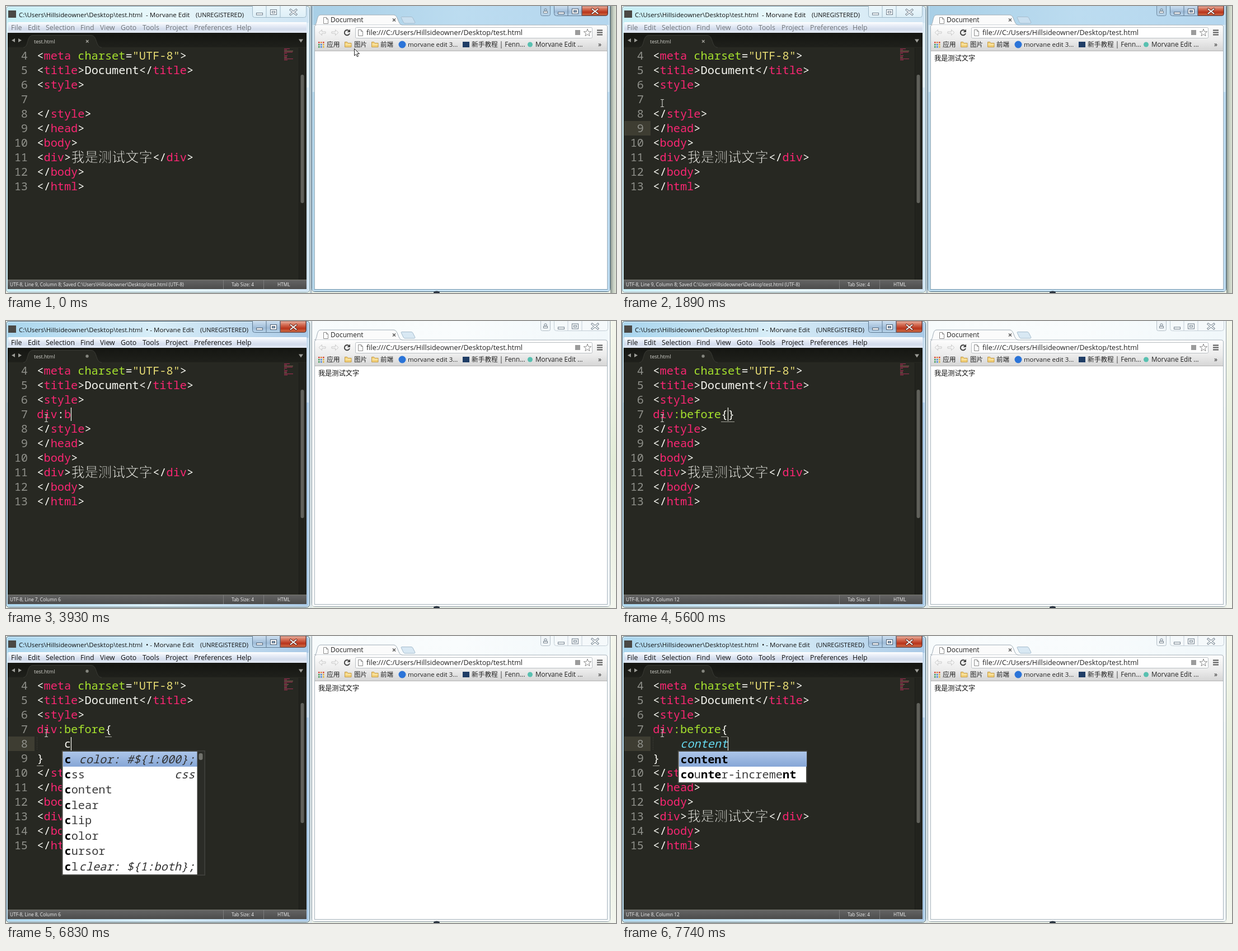
These frames come from a looping animation (1090 px wide and 514 px high, 8000 ms). An HTML page:

```html
<!DOCTYPE html>
<html lang="en">
<head>
<meta charset="utf-8">
<title>Editor and browser</title>
<style>
html, body { margin: 0; width: 100%; height: 100%; overflow: hidden; background: #eaf0e6; }
svg { display: block; width: 1090px; height: 514px; }
text { white-space: pre; font-family: "Open Sans", "Noto Sans CJK SC", "Noto Sans CJK", sans-serif; }
.code { font-family: "Noto Sans Mono", "Noto Sans CJK SC", "Noto Sans CJK", monospace; font-size: 20.28px; }
.cjk { font-family: "Noto Sans CJK SC", "Noto Sans CJK", sans-serif; font-weight: 300; }
.thin { stroke: #272822; stroke-width: .8px; }
</style>
</head>
<body>
<svg id="stage" viewBox="0 0 1090 514" xmlns="http://www.w3.org/2000/svg">
  <defs id="defs"></defs>
  <g id="windows"></g>
  <g id="editor"></g>
  <g id="page"></g>
  <g id="popup"></g>
  <g id="pointer"></g>
</svg>
<script>
const LOOP = 8000, CELL = 12.17, CODE_X = 55.3;
const USER = 'Hillsideowner', APP = 'Morvane Edit';
const HUE = { w: '#f8f8f2', p: '#f92672', g: '#a6e22e', y: '#e6db74', c: '#66d9ef' };

const $ = id => document.getElementById(id);
const esc = s => s.replace(/&/g, '&amp;').replace(/</g, '&lt;').replace(/>/g, '&gt;');
const rect = (x, y, w, h, fill, more = '') =>
  `<rect x="${x}" y="${y}" width="${w}" height="${h}" fill="${fill}" ${more}/>`;
const path = (d, fill, more = '') => `<path d="${d}" fill="${fill}" ${more}/>`;
const line = (d, color, width = 1, more = '') =>
  path(d, 'none', `stroke="${color}" stroke-width="${width}" ${more}`);
const text = (x, y, s, size, fill, more = '') =>
  `<text x="${x}" y="${y}" font-size="${size}" fill="${fill}" ${more}>${esc(s)}</text>`;
const code = (x, y, s, fill, more = '') =>
  `<text class="code" x="${x.toFixed(2)}" y="${y}" fill="${fill}" ${more}>${esc(s)}</text>`;

// Latest row of a [time, value] table
function at(table, t) {
  let value = table[0][1];
  for (const [time, v] of table) if (t >= time) value = v;
  return value;
}

const shades = {
  glassOn: ['#a9d5ed', '#d9eef8', '#a9c9e6'],
  glassOff: ['#c6eef5', '#e9f8fb', '#cfe4f3'],
  sky: ['#a8cfe6', '#bcdcf0', '#b4d6ee'],
  pale: ['#f7fbfc', '#f9fcfd', '#f0f7fa'],
  shadow: ['#87928c', '#c3ccc0', '#dde3d6']
};
const falls = {
  menu: ['#ffffff', '#e6ecf6', '#d3dcec', '#e6ecf6'],
  tabs: ['#151612', '#1f201b'],
  red: ['#e9b5a5', '#d46d54', '#b8341b', '#d4744c'],
  blue: ['#d9e9f6', '#bdd3e8', '#9fbcd8', '#bcd8ee'],
  clear: ['#eef8fc', '#deeff7'],
  status: ['#656565', '#4c4c4c'],
  tool: ['#fdfdfd', '#ececec'],
  marks: ['#eeeeee', '#d6d6d6'],
  pick: ['#adc6e9', '#86a6d6'],
  side: ['#f4f6ec', '#e3ecd8', '#f3f6ee']
};
const gradient = (id, list, dir) => `<linearGradient id="${id}" x2="${dir === 'x' ? 1 : 0}" y2="${dir === 'y' ? 1 : 0}">` +
  list.map((c, i) => `<stop offset="${i / (list.length - 1)}" stop-color="${c}"/>`).join('') + '</linearGradient>';
$('defs').innerHTML =
  Object.entries(shades).map(([id, l]) => gradient(id, l, 'x')).join('') +
  Object.entries(falls).map(([id, l]) => gradient(id, l, 'y')).join('');

// Minimise, maximise and close buttons
function buttons(x, y, h, active, faded) {
  const edge = active ? '#5d7890' : faded ? '#c3ced6' : '#9fb9c8';
  const ink = active ? '#ffffff' : faded ? '#f8fbfc' : '#f4f8fa';
  const base = active ? 'url(#blue)' : faded ? '#f5f9fb' : 'url(#clear)';
  const outline = `stroke="${active ? '#4e5e70' : '#6f7d8a'}"`;
  const cx = x + 73.5, cy = y + h / 2 + .5;
  const cross = `M${cx - 5} ${cy - 4}L${cx + 5} ${cy + 4}M${cx + 5} ${cy - 4}L${cx - 5} ${cy + 4}`;
  return rect(x + .5, y - 3.5, 96, h + 3, base, `rx="4" stroke="${edge}"`) +
    (active ? path(`M${x + 50} ${y}H${x + 96}V${y + h - 4}q0 3-3 3H${x + 50}Z`, 'url(#red)', 'stroke="#6d2a22"') : '') +
    line(`M${x + 25} ${y}v${h - 1}M${x + 50} ${y}v${h - 1}`, edge) +
    rect(x + 7.5, cy + 1.5, 11, 3.5, ink, outline) +
    rect(x + 32.5, cy - 4.5, 11, 9, ink, outline) + rect(x + 35.5, cy - 1.5, 5, 3, active ? '#8aa6c2' : '#f4f8fa', outline) +
    line(cross, active ? '#5e2a22' : '#6f7d8a', 3.6, 'stroke-linecap="square"') +
    line(cross, ink, 1.8, 'stroke-linecap="square"');
}

function docIcon(x, y) {
  return path(`M${x + .5} ${y + .5}h5l3 3v8h-8z`, '#fff', 'stroke="#8b8b8b"') +
    line(`M${x + 5.5} ${y + .5}v3h3`, '#8b8b8b');
}

function folder(x) {
  return path(`M${x + .5} 73.5v-9h4l1.5 2h6v7z`, '#f3d27c', 'stroke="#c39a45"') +
    line(`M${x + 1} 68.5h10.5`, '#fff1c0');
}

function editorFrame(active) {
  const menu = [['File', 9], ['Edit', 39], ['Selection', 71], ['Find', 133], ['View', 168], ['Goto', 205],
    ['Tools', 244], ['Project', 285], ['Preferences', 336], ['Help', 412]];
  return rect(0.5, 0.5, 542, 512, `url(#${active ? 'glassOn' : 'glassOff'})`, `stroke="${active ? '#35566e' : '#7899aa'}" rx="5"`) +
    rect(1, 30, 541, 116, '#fff', 'opacity=".35"') +
    rect(1.5, 1.5, 540, 510, 'none', 'stroke="#effafd" rx="4"') +
    rect(4, 8, 14, 13, '#4a4845') +
    buttons(440, 0, 21, active) +
    rect(4, 29, 533, 19, 'url(#menu)') +
    menu.map(([s, x]) => text(x, 43, s, 12.3, active ? '#111' : '#70757a')).join('') +
    rect(3, 48, 534, 459, '#272822') + rect(3, 48, 534, 26, 'url(#tabs)') +
    path('M30 75C41 75 36 52 48 52H152C164 52 159 75 172 75Z', '#272822') +
    line('M31 74.5C41 74 36 52.5 48 52.5H152C164 52.5 159 74 171 74.5', '#3a3b35') +
    path('M16 58v7l-6-3.5zM22 58v7l6-3.5zM523 59.5h8l-4 6z', '#9b9b96') +
    text(50, 67, 'test.html', 9, '#d5d5cf') +
    rect(524, 75, 13, 415, '#22231e') + line('M523.5 75V490', '#1c1d19') +
    rect(3, 490, 534, 17, 'url(#status)') + line('M3 490.5H537', '#77776f') +
    line('M388.5 491V507M460.5 491V507', '#7c7c7c') +
    text(403, 502, 'Tab Size: 4', 8.3, '#f0f0f0') + text(485, 502, 'HTML', 8.3, '#f0f0f0');
}

function browserFrame(active) {
  const star = Array.from({ length: 10 }, (_, i) => {
    const r = i % 2 ? 2.8 : 7, a = (i / 5 - .5) * Math.PI;
    return (1039 + r * Math.cos(a)).toFixed(1) + ' ' + (48 + r * Math.sin(a)).toFixed(1);
  }).join('L');
  const dots = ['#d9483b', '#e2843a', '#d9483b', '#3e9a5b', '#4a84d8', '#e0b33c', '#3e9a5b', '#4a84d8', '#e0b33c'];
  const ink = '#222';
  return rect(1080, 0, 10, 514, `url(#${active ? 'shadow' : 'side'})`) + rect(543, 0, 4, 514, active ? '#b9c8cf' : '#dfe8ea') +
    rect(546.5, -4.5, 533, 516, `url(#${active ? 'sky' : 'pale'})`, `stroke="${active ? '#3f6078' : '#8d9ba4'}" rx="5"`) +
    rect(547, 34, 532, 120, '#fff', 'opacity=".4"') +
    line('M548 0V510H1078V0', active ? '#e2f1fa' : '#ffffff') +
    rect(955.5, -3.5, 17, 21, active ? '#b4d0e6' : '#f0f5f8', `rx="3" stroke="${active ? '#6f8ca4' : '#b5c0c8'}"`) +
    `<circle cx="964" cy="7" r="2.2" fill="none" stroke="#74818c"/>` + rect(960.5, 9.5, 7, 3, '#fff', 'stroke="#74818c"') +
    buttons(979, 0, 18, active, !active) +
    path('M551 34C557 34 554 16 562 16H693C701 16 700 34 708 34Z', '#fbfbfb', 'stroke="#a0adb7"') +
    path('M706 20.5q0-1 2-1h16q2 0 3 2l4 8q0 1.5-2 1.5h-16q-2 0-3-2z', active ? '#c9dfef' : '#d8e8f3', 'stroke="#a6bccd"') +
    docIcon(567, 20) + text(580, 29, 'Document', 12, ink) +
    line('M691 22.5l5 5m0-5l-5 5', '#5a5a5a', 1.5) +
    rect(551, 34, 524, 26, 'url(#tool)') + line('M551.5 507V37q0-3 3-3M707 34H1071q3.5 0 3.5 3V507', '#a9b4bc') +
    path('M559 47.5l5.5-5v3.5h6.5v3h-6.5v3.5z', '#f5f5f5', 'stroke="#c9c9c9"') +
    path('M594 47.5l-5.5-5v3.5h-6.5v3h6.5v3.5z', '#f5f5f5', 'stroke="#c9c9c9"') +
    line('M613 44.5a4.7 4.7 0 1 0 1 4.5', '#454545', 2) + path('M615 41.5v5.5h-5.5z', '#454545') +
    rect(624.5, 38.5, 423, 19, '#fff', 'rx="2" stroke="#b9bec2"') + docIcon(629, 42) +
    text(644, 52, `file:///C:/Users/${USER}/Desktop/test.html`, 12.6, ink) +
    rect(1017, 43, 9, 9, '#9b9b9b') +
    path('M' + star + 'Z', '#fff', 'stroke="#8c8c8c"') +
    line('M1056 43.5h10M1056 47.5h10M1056 51.5h10', '#555', 2) +
    rect(552, 59, 522, 21, 'url(#marks)') + line('M552 80.5H1074', '#b4b4b4') +
    dots.map((c, i) => rect(558 + i % 3 * 4, 64 + Math.floor(i / 3) * 4, 2.6, 2.6, c)).join('') +
    text(573, 73, '应用', 11.8, ink) + folder(605) + text(622, 73, '图片', 11.5, ink) +
    folder(653) + text(669, 73, '前端', 11.5, ink) +
    '<circle cx="708" cy="69" r="6.5" fill="#2b74d8"/>' + text(718, 73, APP.toLowerCase() + ' 3...', 11.4, ink) +
    rect(816, 64, 12, 10, '#1f3d66') + text(832, 73, '新手教程 | Fenn...', 11.7, ink) +
    '<circle cx="936.5" cy="69" r="4.5" fill="#58c0b0"/>' + text(946, 73, APP + ' ...', 11.7, ink) +
    text(1058, 73, '»', 12, ink) +
    rect(552, 81, 522, 426, '#fff') + line('M551 507.5H1075', active ? '#7f9db2' : '#a9b4bc') +
    '<ellipse cx="769.5" cy="513" rx="5.5" ry="2.5" fill="#2a3440"/>';
}

const typed = [[0, ''], [2430, 'd'], [2860, 'di'], [3470, 'div'], [3780, 'div:'], [3930, 'div:b'], [4240, 'div:be'],
  [4390, 'div:bef'], [4540, 'div:befo'], [4690, 'div:befor'], [4840, 'div:before'], [5600, 'div:before{}'], [5910, 'div:before{']];
const prop = [[0, ''], [6830, 'c'], [6980, 'co'], [7130, 'con'], [7440, 'cont'], [7590, 'conte'], [7740, 'content']];
const caretOn = [[0, false], [2040, true], [3010, false], [3160, true], [5150, false], [5300, true], [6220, false], [6370, true]];
const pointer = [[0, [622, 77]], [150, [618, 65]], [300, [612, 53]], [440, [609, 47]], [880, [575, 110]], [1020, [470, 230]],
  [1170, [330, 290]], [1290, [230, 262]], [1440, [150, 225]], [1590, [100, 195]], [1740, [76, 178]], [1890, [72, 174]]];

// Asterisks switch bold on and off; width, scrollbar flag, then rows
const hints = {
  c: [254, 1, ['*c*', 'color: #${1:000};'], ['*c*ss', 'css'], ['*c*ontent'], ['*c*lear'], ['*c*lip'], ['*c*olor'],
    ['*c*ursor'], ['*c*l', 'clear: ${1:both};']],
  co: [254, 1, ['*co*lor'], ['*co*ntent'], ['*co*unter-reset'], ['*c*l*o*', 'clear: ${1:both};'], ['*co*lumns'],
    ['*c*urs*o*r'], ['*c*apti*o*n-side'], ['*co*lumn-rule']],
  con: [376, 0, ['*con*tent'], ['*cn*t-*o*q', 'content: open-quote;'], ['*cn*t-*no*q', 'content: no-open-quote;'],
    ['*c*t-*no*q', 'content: no-open-quote;'], ['*co*u*n*ter-increment'], ['*co*u*n*ter-reset'], ['*c*apti*on*-side'],
    ['ba*c*kground-*o*rigi*n*']],
  cont: [229, 0, ['*cont*ent'], ['*co*u*nt*er-increment'], ['*co*u*nt*er-reset']],
  conte: [229, 0, ['*conte*nt'], ['*co*u*nte*r-increment'], ['*co*u*nte*r-reset']],
  content: [229, 0, ['*content*'], ['*co*u*nte*r-increme*nt*']]
};

function popup(key) {
  if (!key) return '';
  const [w, bar, ...rows] = hints[key], h = rows.length * 27.5, right = 101 + w - (bar ? 13 : 0);
  let out = rect(100.5, 206, w + .5, h + 2, '#fff', 'stroke="#42433e" stroke-width="2"') +
    rect(102, 207, right - 102, 27, 'url(#pick)');
  if (bar) out += rect(342, 206, 13, h + 2, '#2b2c27', 'stroke="#42433e"') + rect(344.5, 210, 7, 12, '#71726c', 'rx="3"');
  rows.forEach(([word, note], i) => {
    const y = 227.5 + i * 27.45;
    let x = 104.5;
    word.split('*').forEach((s, n) => {
      if (s) out += code(x, y, s, n % 2 ? '#000' : '#3a3a3a', n % 2 ? 'font-weight="700"' : '');
      x += s.length * CELL;
    });
    if (note) out += code(right - 4.5 - note.length * CELL, y, note, '#333', 'font-style="italic"');
  });
  return out;
}

// Colour markup: "key+text" pieces parted by "|"
function codeLine(src, y) {
  let x = CODE_X, out = '';
  if (!src) return out;
  for (const part of src.split('|')) {
    const s = part.slice(1), wide = /[\u4e00-\u9fff]/.test(s);
    out += wide
      ? `<text class="cjk thin" x="${x + .3}" y="${y + 1}" font-size="24.2" fill="${HUE.w}">${s}</text>`
      : code(x, y, s, HUE[part[0]], part[0] === 'c' ? 'font-style="italic"' : '');
    x += s.length * CELL * (wide ? 2 : 1);
  }
  return out;
}

function selector(s) {
  if (s.length < 3) return s && 'w' + s;
  if (s.startsWith('div:before')) return 'pdiv|g:before|w' + s.slice(10);
  const tail = s.slice(4);
  return 'pdiv' + (s.length > 3 ? '|w:' : '') + (tail ? (tail === 'b' ? '|p' : '|w') + tail : '');
}

function editor(s) {
  const { sel, word, split, active } = s;
  const lines = ['w<|pmeta|g charset|w=|y"UTF-8"|w>', 'w<|ptitle|w>Document</|ptitle|w>', 'w<|pstyle|w>', selector(sel)];
  if (split) lines.push('w    ' + (word === 'content' ? '|c' : '|w') + word, 'w}');
  lines.push('w</|pstyle|w>', 'w</|phead|w>', 'w<|pbody|w>', 'w<|pdiv|w>|w我是测试文字|w</|pdiv|w>', 'w</|pbody|w>', 'w</|phtml|w>');
  let out = '';
  if (s.glow) out += rect(4, s.glow, 47, 26, '#3e3d32');
  if (split) out += line('M55.5 181V205', '#4a4a43', 1, 'stroke-dasharray="1 2"');
  lines.forEach((src, i) => {
    const y = 96 + i * 26;
    out += code(39 - String(i + 4).length * CELL, y, String(i + 4), '#8f908a') + codeLine(src, y);
  });
  const col = split ? 4 + word.length : sel.replace('}', '').length;
  if (s.caret) out += rect(CODE_X + col * CELL - .3, split ? 181 : 155, 1.2, 24, '#f8f8f0');
  if (sel.includes('{')) out += line(split ? 'M177 180.5h12M55 232.5h12' : 'M177 180.5h24', '#a5a59c');

  const mini = [10, 5, 16, 15, 5, split ? 8 : 1, 6, 5, 5, 16, 6];
  out += mini.map((w, i) => rect(497, 76 + i * 2, w, 1.2, i % 3 === 2 ? '#8a6a55' : '#a83055', 'opacity=".85"')).join('');
  out += rect(526.5, split ? 120 : 123, 6, split ? 215 : 230, '#60615b', 'rx="3"');

  const dirty = sel !== '';
  out += text(23, 20, `C:\\Users\\${USER}\\Desktop\\test.html`, 11.4, '#111') +
    text(250, 20, (dirty ? '• - ' : '- ') + APP, 11.6, '#111') +
    text(dirty ? 347 : 339, 20, '(UNREGISTERED)', 11, '#111');
  out += dirty ? '<circle cx="145" cy="63" r="2.7" fill="#85867f"/>'
    : line('M143 61l4.5 4.5m0-4.5l-4.5 4.5', '#a9a9a2', 1.2);
  const place = active ? `Line ${split ? 8 : 7}, Column ${col + 1}` : 'Line 9, Column 8';
  return out + text(7, 502, `UTF-8, ${place}` +
    (active ? '' : `; Saved C:\\Users\\${USER}\\Desktop\\test.html (UTF-8)`), 8.3, '#f2f2f2');
}

function cursor([x, y]) {
  if (x > 52 && x < 523) {
    const d = `M${x - 3} ${y - 6.5}h2.5l.5 1l.5-1h2.5M${x} ${y - 6}v12M${x - 3} ${y + 6.5}h2.5l.5-1l.5 1h2.5`;
    return line(d, '#c9c9c4', 1.2);
  }
  return path(`M${x + .5} ${y - .5}v12.5l3-2.7l2 4.5l2-.9l-2-4.4h4z`, '#fff', 'stroke="#222"');
}

const shown = {};
function put(id, html) {
  if (shown[id] !== html) $(id).innerHTML = shown[id] = html;
}
const frames = [false, true].map(on => browserFrame(!on) + editorFrame(on));

function draw(t) {
  const active = t >= 2040, split = t >= 5910, word = at(prop, t);
  put('windows', frames[+active]);
  put('editor', editor({
    active, split, word, sel: at(typed, t), caret: at(caretOn, t),
    glow: t >= 6220 ? 180 : t >= 1170 && !active ? 206 : 0
  }));
  put('page', t < 590 ? '' : text(558, 97.5, '我是测试文字', 12.2, '#111', 'class="cjk" style="font-weight:400"'));
  put('popup', popup(word));
  put('pointer', cursor(at(pointer, t)));
}

const start = performance.now();
function tick() {
  draw((performance.now() - start) % LOOP);
  requestAnimationFrame(tick);
}
tick();
</script>
</body>
</html>
```
